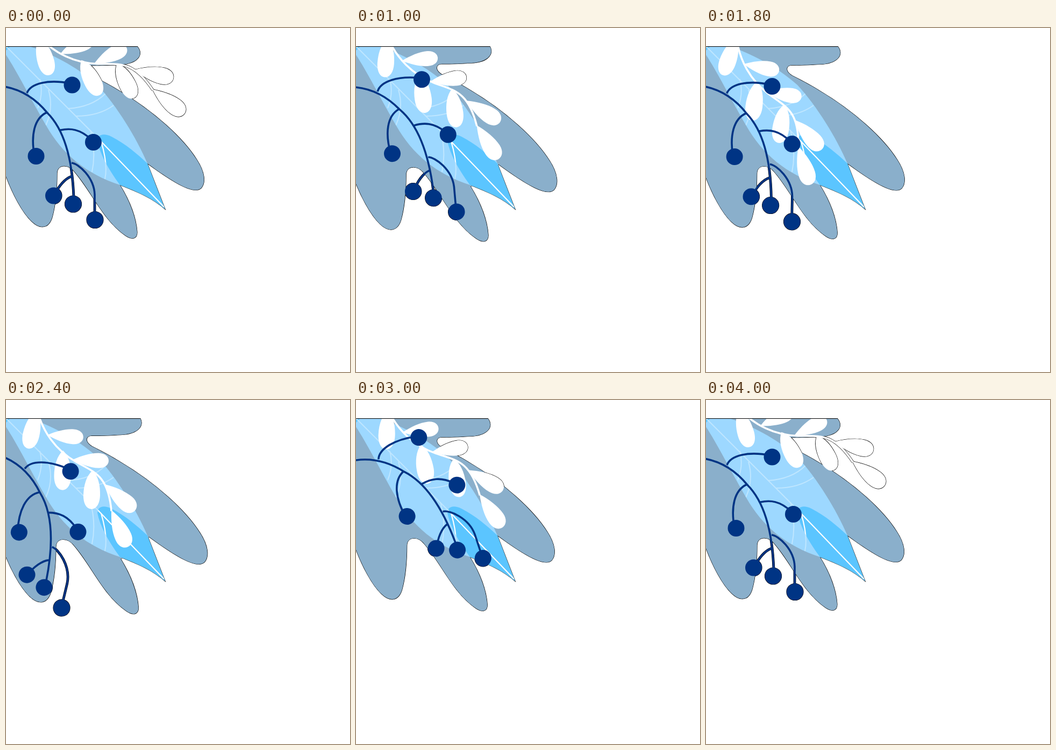
Recreate the animation shown at these times as an HTML page with a canvas. Size 640 by 640 pixels, loop 4100 ms.

```html
<!DOCTYPE html>
<html>
<head>
<meta charset="utf-8">
<style>
  html, body { margin: 0; width: 100%; height: 100%; overflow: hidden; background: #fff; }
  canvas { display: block; }
</style>
</head>
<body>
<canvas id="stage" width="640" height="640"></canvas>
<script>
const ctx = document.getElementById('stage').getContext('2d');
const path = d => new Path2D(d);

const GREY = '#8aafcb', PALE = '#9dd8ff', BRIGHT = '#5bc5ff', NAVY = '#003484', WHITE = '#fff';

const backdrop = path(`M-30 0H225Q236 24 244 34C258 50 244 67 212 68C190 69 176 70 160 69.5
  C149 70 146 80 160 89C172 95 195 107 211 117C275 155 330 205 355 245C370 268 372 288 363 298
  C350 310 315 290 263 252L212 292C228 318 242 350 244 380C244 392 235 395 222 386
  C180 357 160 305 127 267C116 253 96 253 95 270C95 300 92 330 86 352C80 372 65 376 48 360
  C30 343 12 308 0 276L-30 210Z`);
const bigLeaf = path(`M-5 30L40 33C75 44 128 68 170 106C207 146 243 205 263 252L296 337
  C272 316 245 305 212 292C150 272 105 235 75 182C45 130 20 80 0 50Z`);
const leafTip = path(`M172 203C176 197 186 197 196 202C222 215 245 235 263 252
  C272 275 283 305 296 337C272 316 245 305 212 292C190 262 175 235 170 210Z`);
const leafCorner = path('M0 34H8L0 42Z');
const veins = path(`M0 34L170 204L294 333M63 95Q70 122 59 149M79 115Q89 150 74 181
  M115 150Q160 147 185 122M130 164Q172 164 200 144M157 190Q168 230 160 268M177 211Q190 255 184 281`);

const slimPetal = path('M0 0C18-9 36-15 52-15C65-15 72-8 72 0C72 8 65 15 52 15C36 15 18 9 0 0Z');
const fullPetal = path('M0 0C10-11 28-15.5 46-15.5C62-15.5 72-9 72 0C72 9 62 15.5 46 15.5C28 15.5 10 11 0 0Z');
const twig = path('M56 10C66 60 95 95 130 115S190 140 196 207');
// shape, x, y, direction in degrees, scale
const petals = [
  [fullPetal, 57, 20, 103, 1], [slimPetal, 77, 65, 4, .93], [fullPetal, 106, 94, 91, 1.02],
  [slimPetal, 124, 111, 2, .93], [fullPetal, 161, 131, 92, 1],
  [slimPetal, 184, 157, 41, 1.03], [slimPetal, 196, 205, 66, 1.04]
];

const stems = path(`M-10 108Q41 114 77 158Q122 203 126 315M39 121C46 103 78 95 120 103
  M76 157C52 168 46 200 53 238M101 190C120 186 138 188 158 207
  M122 276C110 280 97 295 91 310M122 251C135 252 164 278 165 310V350`);
const berries = [[123, 106], [56, 238.5], [162.5, 212.5], [88.5, 312], [125, 327.5], [165.5, 357]];
const berryDots = new Path2D();
for (const [x, y] of berries) {
  berryDots.moveTo(x + 15.5, y);
  berryDots.arc(x, y, 15.5, 0, 7);
}

const ease = u => (1 - Math.cos(Math.PI * u)) / 2;
const sway = [[0, 0], [.5, 4.2], [1.35, -10.4], [2.3, 15], [3, -18.4], [4, 0]];

function berryAngle(t) {
  const i = Math.max(1, sway.findIndex(key => t <= key[0]));
  const [t0, a] = sway[i - 1], [t1, b] = sway[i];
  return a + (b - a) * ease((t - t0) / (t1 - t0));
}
const twigAngle = t => t < 1.9 ? 19.67 * t : 17.85 * (4 - t);
const pulse = t => t < 3.2 ? 1 + .031 * ease(t / .8) : 1;

// The silhouette pass paints everything black, a little larger.
let silhouette;

function fill(shape, color) {
  ctx.fillStyle = silhouette ? '#000' : color;
  ctx.fill(shape);
  if (silhouette) line(shape, color, 0);
}

function line(shape, color, width) {
  ctx.strokeStyle = silhouette ? '#000' : color;
  ctx.lineWidth = silhouette ? width + 1.2 : width;
  ctx.stroke(shape);
}

function around(x, y, degrees, scale, draw) {
  ctx.save();
  ctx.translate(x, y);
  ctx.rotate(degrees * Math.PI / 180);
  ctx.scale(scale, scale);
  ctx.translate(-x, -y);
  draw();
  ctx.restore();
}

function lineInside(area, shape, color, width) {
  ctx.save();
  ctx.clip(area);
  line(shape, color, width);
  ctx.restore();
}

function drawLeaf() {
  fill(bigLeaf, PALE);
  if (silhouette) return;
  fill(leafCorner, BRIGHT);
  lineInside(bigLeaf, veins, '#bfe6ff', 2);
  fill(leafTip, BRIGHT);
  lineInside(leafTip, veins, WHITE, 2.2);
}

function drawTwig() {
  line(twig, WHITE, 3.6);
  for (const [shape, x, y, degrees, scale] of petals) {
    around(x, y, degrees, scale, () => {
      ctx.translate(x, y);
      fill(shape, WHITE);
    });
  }
}

function drawBerries() {
  line(stems, NAVY, 3.6);
  fill(berryDots, NAVY);
}

function drawPass(t, top) {
  ctx.save();
  ctx.beginPath();
  ctx.rect(0, top, 640, 640);
  ctx.clip();
  around(165, 175, 0, pulse(t), () => fill(backdrop, GREY));
  drawLeaf();
  around(56, 9.5, twigAngle(t) - 28.6, 1, drawTwig);
  around(7.5, 107, berryAngle(t), 1, drawBerries);
  ctx.restore();
}

function frame(now) {
  const t = Math.floor(now % 4100 / 100) / 10;
  ctx.clearRect(0, 0, 640, 640);
  silhouette = true;
  drawPass(t, 34);
  silhouette = false;
  drawPass(t, 35);
  requestAnimationFrame(frame);
}
requestAnimationFrame(frame);
</script>
</body>
</html>
```
